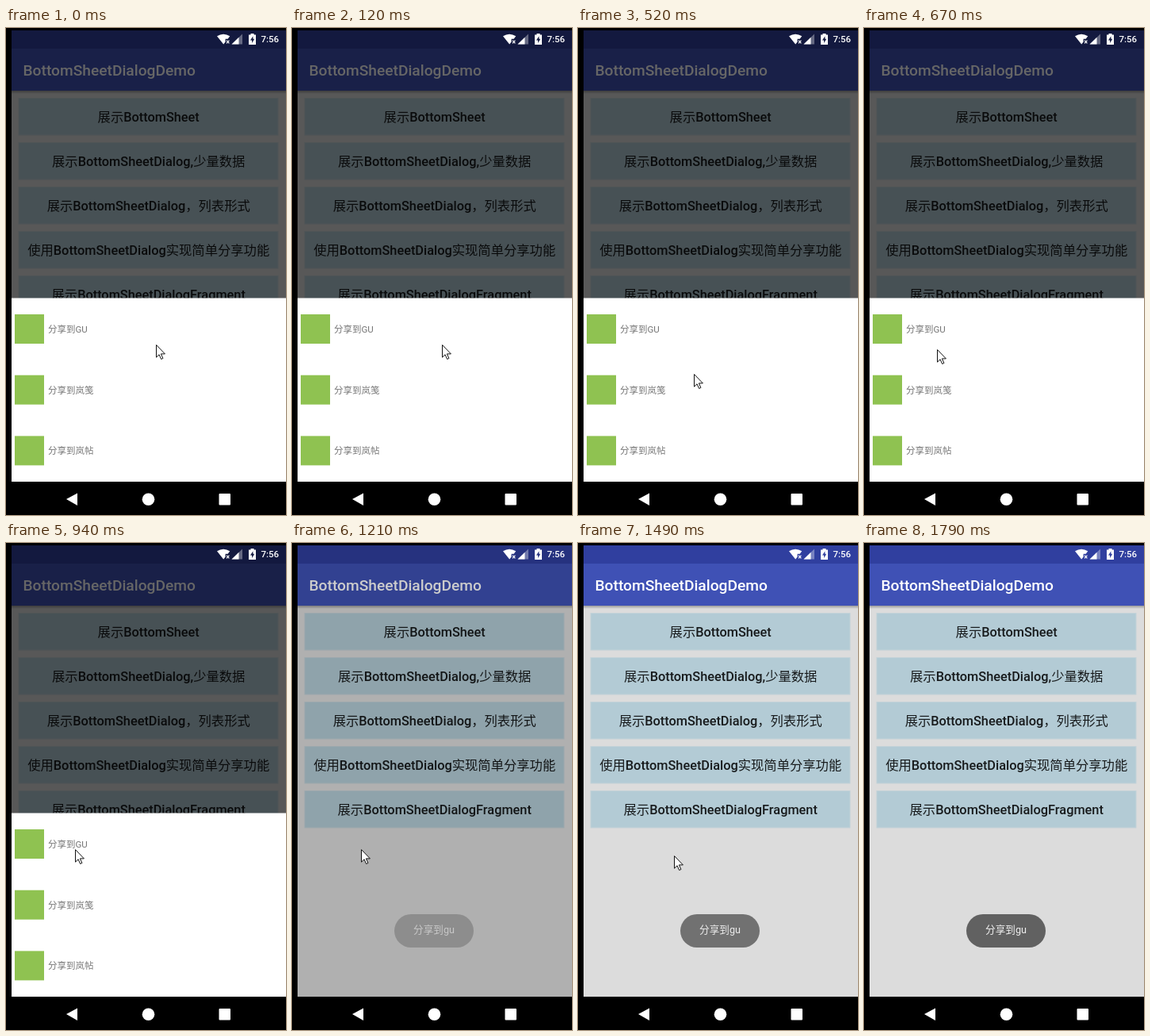
Animation, 353 px wide and 614 px high, one loop 2.53 s. Source, as an HTML page:

```html
<!DOCTYPE html>
<html lang="zh">
<head>
<meta charset="utf-8">
<title>BottomSheetDialogDemo</title>
<style>
html, body { margin: 0; width: 100%; height: 100%; overflow: hidden; background: #000; }
svg { display: block; width: 100%; height: 100%; }
text { font-family: Roboto, "Noto Sans CJK SC", "Noto Sans CJK", sans-serif; }
.title { font-size: 19.2px; font-weight: 500; fill: #fff; }
.label { font-size: 16.32px; font-weight: 500; fill: #000; fill-opacity: .87; text-anchor: middle; }
.cjk { font-weight: 400; }
.item { font-size: 11.5px; fill: #757575; }
.toast { font-size: 12.6px; text-anchor: middle; }
.clock { font-size: 11.5px; font-weight: 500; fill: #fff; }
</style>
</head>
<body>
<svg viewBox="0 0 353 614">
  <defs>
    <linearGradient id="shade" x2="0" y2="1">
      <stop offset="0" stop-opacity=".3"/>
      <stop offset="1" stop-opacity="0"/>
    </linearGradient>
  </defs>
  <rect width="353" height="614"/>
  <rect x="7" y="26" width="346" height="546" fill="#dcdcdc"/>
  <rect x="7" y="3" width="346" height="23" fill="#303f9f"/>
  <rect x="7" y="26" width="346" height="53" fill="#3f51b5"/>
  <rect x="7" y="79" width="346" height="4" fill="url(#shade)"/>
  <text class="title" x="21.5" y="60">BottomSheetDialogDemo</text>
  <g id="buttons"></g>
  <rect id="dim" x="7" y="3" width="346" height="569"/>

  <g id="status" fill="#fff">
    <path d="M266 10.3Q274 5.2 282.3 10.3L279.6 13.8H276.6V17.4L274.2 20.4Z"/>
    <path d="M278 15.6L281.4 19.4M281.4 15.6L278 19.4" stroke="#fff" stroke-width="1.2"/>
    <path d="M298 7.5V20.5H284.5Z" opacity=".35"/>
    <path d="M293.5 11.8V20.5H284.5Z"/>
    <path d="M308.5 7H312.5V8.5H315V21H306V8.5H308.5Z"/>
    <path id="bolt" d="M311.4 10.2L308 15.4H310.1V19L313.2 13.8H311.4Z"/>
    <text class="clock" x="321.5" y="18">7:56</text>
  </g>

  <g id="sheet">
    <rect x="7" y="340.5" width="346" height="231.5" fill="#fff"/>
  </g>
  <g id="toast">
    <rect id="pill" x="129" y="468" width="100" height="42" rx="21"/>
    <text id="message" class="toast" x="179" y="492">分享到gu</text>
  </g>

  <g fill="#fff">
    <path d="M76 594L90 586.5V602Z"/>
    <circle cx="179.5" cy="594.3" r="7.8"/>
    <rect x="268.5" y="587" width="14.5" height="14.5" rx="1"/>
  </g>
  <path id="cursor" d="M.5 .6V16.2L4.1 12.8L6.6 18.5L8.9 17.5L6.4 11.9H11.4Z"
        fill="#fff" stroke="#111" stroke-width="1"/>
</svg>
<script>
const LOOP = 2530;
const $ = id => document.getElementById(id);

const labels = [
  "展示BottomSheet",
  "展示BottomSheetDialog,少量数据",
  "展示BottomSheetDialog，列表形式",
  "使用BottomSheetDialog实现简单分享功能",
  "展示BottomSheetDialogFragment"
];
const light = s => s.replace(/[^\x00-\x7f]+/g, m => `<tspan class="cjk">${m}</tspan>`);

$("buttons").innerHTML = labels.map((s, i) => {
  const y = 88 + i * 56;
  return `<rect x="16" y="${y + .5}" width="327" height="46.5" fill="#b3cbd5" stroke="#c3d2d8"/>
    <text class="label" x="179.7" y="${y + 30.4}">${light(s)}</text>`;
}).join("");

$("sheet").innerHTML += ["GU", "岚笺", "岚帖"].map((s, i) => {
  const y = 379.5 + i * 76.7;
  return `<rect x="11" y="${y - 18.5}" width="37" height="37" fill="#8fc251"/>
    <text class="item" x="53" y="${y + 4.3}">分享到${s}</text>`;
}).join("");

// Each track is a list of [start time, value]; values hold until the next step.
const pointer = [
  [0, [189, 399]], [400, [166, 421]], [520, [146, 436]], [670, [92, 405]],
  [820, [88, 390]], [940, [87, 386]], [1490, [121, 394]], [1630, [118, 392]], [1790, null]
];
const dimming = [[0, .6], [1210, .2], [1330, 0]];
const toast = [
  [0, null], [1210, ["#8d8d8d", "#c8c8c8"]], [1330, ["#8a8a8a", "#e4e4e4"]],
  [1490, ["#717171", "#ececec"]], [1630, ["#616161", "#f0f0f0"]]
];
const at = (track, t) => track.filter(step => step[0] <= t).pop()[1];
const show = (id, on) => $(id).setAttribute("visibility", on ? "visible" : "hidden");

function draw(t) {
  const dim = at(dimming, t), pos = at(pointer, t), tint = at(toast, t);
  $("dim").setAttribute("opacity", dim);
  $("bolt").setAttribute("fill", `rgb(${[48, 63, 159].map(c => Math.round(c * (1 - dim)))})`);
  show("sheet", t < 1210);
  show("toast", tint);
  if (tint) {
    $("pill").setAttribute("fill", tint[0]);
    $("message").setAttribute("fill", tint[1]);
  }
  show("cursor", pos);
  if (pos) $("cursor").setAttribute("transform", `translate(${pos})`);
}

function tick() {
  draw(performance.now() % LOOP);
  requestAnimationFrame(tick);
}
tick();
</script>
</body>
</html>
```
